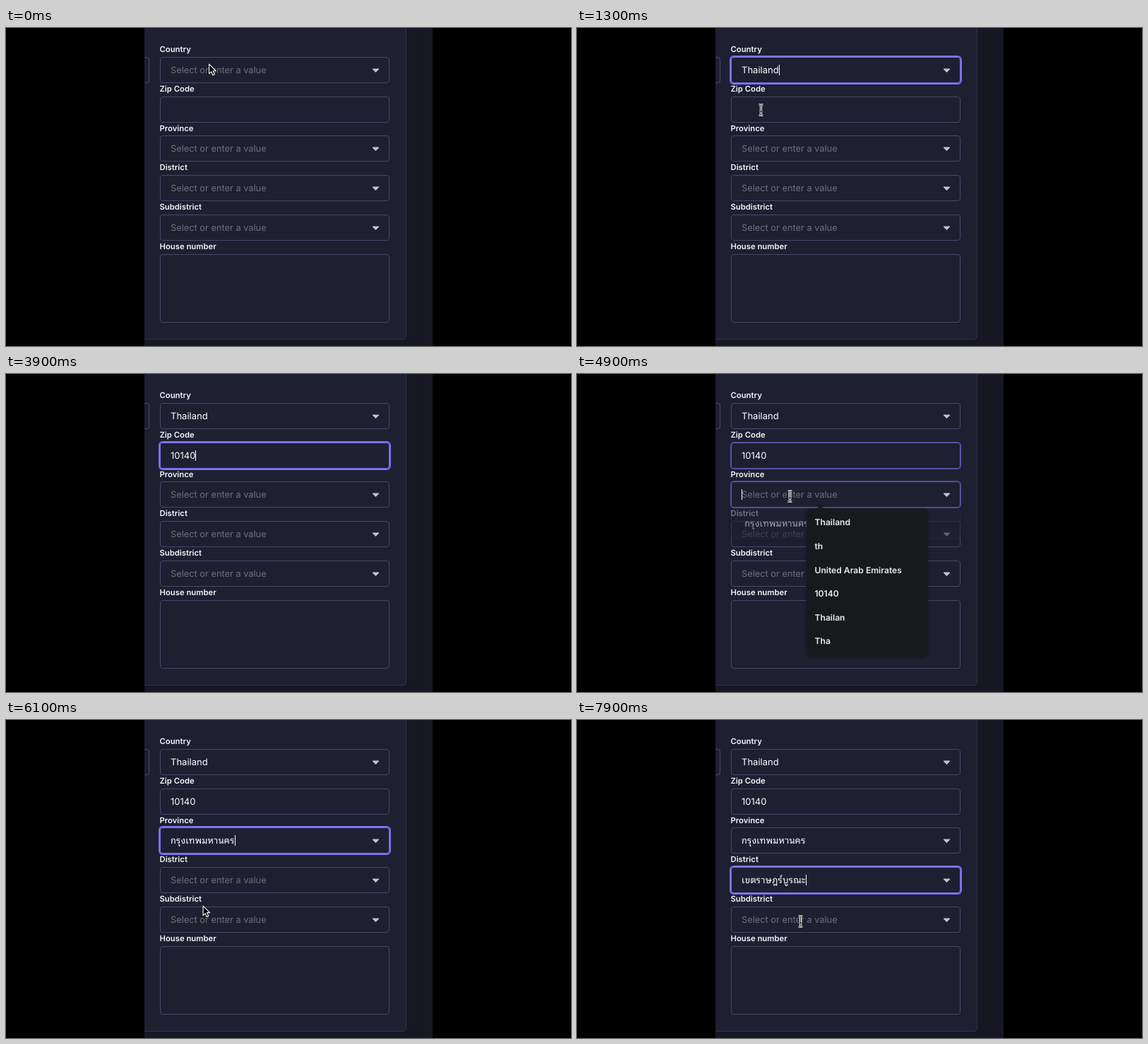
Animation, 800 px wide and 450 px high, one loop 8 s. Source, as an HTML page:

```html
<!DOCTYPE html>
<html lang="en">
<head>
<meta charset="utf-8">
<title>Address form</title>
<style>
  html, body { margin: 0; width: 100%; height: 100%; overflow: hidden; background: #000; }
  #stage { position: absolute; left: 0; top: 0; width: 800px; height: 450px; overflow: hidden;
    font: 12.8px/16px Inter, "Noto Sans Thai Looped", "Noto Looped Thai", "Noto Serif Thai", "Noto Sans Thai", "Noto Sans", sans-serif;
    color: #fff; text-rendering: geometricPrecision; white-space: pre; }
  #stage div, #stage svg, #stage i { position: absolute; box-sizing: border-box; }
  #page { left: 196px; top: 0; width: 408px; height: 450px; background: #171723; overflow: hidden; }
  #card { left: -20px; top: -20px; width: 391px; height: 461px; background: #1e1f31;
    border: 1px solid #303050; border-radius: 5px; }
  .label { left: 217.5px; font-size: 11.3px; font-weight: 600; color: #f5f5f9; }
  .field { left: 218px; width: 325px; height: 37px; padding-left: 14px; line-height: 37px;
    border: 1px solid #48486a; border-radius: 4px; }
  .value { font-size: 13px; }
  .hint { color: #70707a; }
  .field i { top: 10px; width: 1px; height: 15px; background: #fff; }
  .field svg { left: 298px; top: 14px; overflow: visible; }
  .list { left: 218px; width: 325px; padding: 4px; background: #1e1f31; border: 1px solid #2b2b45;
    border-radius: 4px; box-shadow: 0 2px 8px #0003; font-size: 13px; }
  .list div { left: 4px; width: 317px; height: 33.5px; padding-left: 14.3px; line-height: 33.5px; border-radius: 3px; }
  .popup { width: 172px; background: #171a1d; border-radius: 8px; box-shadow: 0 1px 4px #0004;
    font-size: 12.1px; font-weight: 600; color: #ebebed; }
  .popup div { left: 11.5px; }
  .popup svg { left: 13px; top: -6px; }
  #pointer { left: 0; top: 0; overflow: visible; }
</style>
</head>
<body>
<div id="stage">
  <div id="page"><div id="card"></div></div>
</div>
<script>
const LOOP = 8000, HINT = 'Select or enter a value';
const BANGKOK = 'กรุงเทพมหานคร', DISTRICT = 'เขตราษฎร์บูรณะ';
const SUGGESTIONS = ['Thailand', 'th', 'United Arab Emirates', '10140', 'Thailan', 'Tha'];
const stage = document.getElementById('stage');

const clamp = v => Math.max(0, Math.min(1, v));
const ramp = (t, start, length) => clamp((t - start) / length);
const mix = (a, b, p) => a + (b - a) * p;
const show = (el, on) => { el.style.display = on ? '' : 'none'; };

function add(parent, cls, style = {}, html = '') {
  const el = document.createElement('div');
  el.className = cls;
  el.innerHTML = html;
  for (const key in style) el.style[key] = typeof style[key] === 'number' ? style[key] + 'px' : style[key];
  parent.appendChild(el);
  return el;
}

// Each value is [time, text]; focus is [from, to].
const fieldSpecs = [
  { name: 'Country', select: true, focus: [500, 1500], values: [[1050, 'Thailand']] },
  { name: 'Zip Code', focus: [1500, 4830],
    values: [[2540, '1'], [2980, '10'], [3400, '101'], [3700, '1014'], [3850, '10140']] },
  { name: 'Province', select: true, focus: [4830, 6450], values: [[5650, BANGKOK]] },
  { name: 'District', select: true, focus: [6450, 9000], values: [[7450, DISTRICT]] },
  { name: 'Subdistrict', select: true, values: [] },
  { name: 'House number', values: [], height: 97.5 }
];
const fieldTop = i => 40.9 + 55.75 * i;
const ARROW = '<svg width="12" height="8"><path d="M2 2H11L6.5 6.6Z" fill="#c3c3d0" stroke="#c3c3d0" stroke-linejoin="round"/></svg>';

add(stage, 'field', { left: 196, top: 41, width: 7, borderLeft: 'none', padding: 0, borderRadius: '0 4px 4px 0' });

const fields = fieldSpecs.map((spec, i) => {
  add(stage, 'label', { top: fieldTop(i) - 18.9 }, spec.name);
  const box = add(stage, 'field', { top: fieldTop(i), height: spec.height || 37 },
    '<span class="value"></span><i></i><span class="hint"></span>' + (spec.select ? ARROW : ''));
  const [value, caret, hint] = box.children;
  return { ...spec, box, value, caret, hint };
});

function drawField(f, t) {
  const [from, to] = f.focus || [9000, 9000];
  const past = f.values.filter(v => v[0] <= t);
  const last = past[past.length - 1];
  f.value.textContent = last ? last[1] : '';
  f.hint.textContent = f.select && !last ? HINT : '';
  const blinkStart = last ? last[0] : from;
  show(f.caret, t >= from && t < to && (t - blinkStart) % 1000 < 500);
  const p = ramp(t, from, 150) * (1 - ramp(t, to, 150));
  const [r, g, b] = [[72, 123], [72, 115], [106, 243]].map(([a, z]) => mix(a, z, p));
  f.box.style.borderColor = `rgb(${r},${g},${b})`;
  f.box.style.boxShadow = `0 0 0 ${2 * p}px rgba(123,115,243,${p})`;
}

// Option lists that slide in below a field.
const lists = [
  { field: 0, items: ['Thailand'], from: 570, to: 1050 },
  { field: 2, items: [BANGKOK], from: 4830, to: 5650 },
  { field: 3, items: [DISTRICT, 'เขตทุ่งครุ'], from: 6480, to: 7450 }
].map(l => {
  const top = fieldTop(l.field) + 41.3;
  const box = add(stage, 'list', { top, height: 10 + 33.5 * l.items.length });
  const rows = l.items.map((text, i) => add(box, '', { top: 4 + 33.5 * i }, text));
  return { ...l, top, box, rows };
});

function drawList(l, t, pointer) {
  const enter = ramp(t, l.from, 120), leave = ramp(t, l.to, 100);
  show(l.box, enter > 0 && leave < 1);
  l.box.style.opacity = enter * (1 - leave);
  l.box.style.transform = `translateY(${-8 * (1 - enter)}px)`;
  l.rows.forEach((row, i) => {
    const y = pointer.y - l.top - 2 - 33.5 * i;
    row.style.background = !pointer.beam && y >= 0 && y < 33.5 ? '#191825' : '';
  });
}

// Browser suggestions, shown and hidden at once.
const popups = [
  { left: 325, top: 79.6, from: 600, to: 1050 },
  { left: 310, top: 141, from: 1600, to: 2600 },
  { left: 310, top: 141, width: 146, items: ['10140'], from: 2600, to: 3880 },
  { left: 325, top: 190.4, from: 4870, to: 5650 },
  { left: 325, top: 246.6, from: 6520, to: 7450 }
].map(p => {
  const items = p.items || SUGGESTIONS;
  const box = add(stage, 'popup',
    { left: p.left, top: p.top, width: p.width || 172, height: 8.5 + 33.5 * items.length },
    '<svg width="13" height="7"><path d="M0 7Q3 6 5 2Q6.5 0 8 2Q10 6 13 7Z" fill="#171a1d"/></svg>');
  items.forEach((text, i) => add(box, '', { top: 12 + 33.6 * i }, text));
  return { ...p, box };
});

// Pointer steps: time, x, y, text beam or arrow.
const path = [
  [0, 287, 51, 0], [200, 286, 58, 1], [600, 286, 58, 1], [780, 276, 84, 0], [980, 263, 103, 0],
  [1060, 263, 103, 0], [1200, 260.5, 113, 1], [1300, 260.5, 116, 1],
  [4080, 345, 90, 1], [4200, 338, 112, 1], [4500, 301.5, 173, 1], [4950, 301.5, 173, 1],
  [5150, 294, 193, 0], [5450, 282, 212, 0], [5750, 282, 212, 0], [6100, 278.5, 263, 0],
  [6220, 277, 244, 1], [6380, 274, 231, 1], [6500, 274, 231, 1], [6580, 264, 246, 0],
  [6700, 255, 252.5, 0], [7000, 255, 252.5, 0], [7250, 259, 267, 0], [7500, 259, 267, 0],
  [7660, 285, 276, 1], [7900, 316.5, 285, 1], [8000, 316.5, 285, 1]
];
stage.insertAdjacentHTML('beforeend', `<svg id="pointer" width="1" height="1" stroke-linejoin="round">
  <defs><path id="beam" d="M-2.8-7.5Q0-7.5 0-5.5Q0-7.5 2.8-7.5M0-5.5V5.5M-2.8 7.5Q0 7.5 0 5.5Q0 7.5 2.8 7.5M-1.8 2H1.8"/></defs>
  <path class="arrow" d="M.6 .2V13.6L3.7 10.8L5.8 15.7L8.2 14.7L6.1 9.8H10.2Z" fill="#000" stroke="#fff" stroke-width="1.1"/>
  <g class="text" fill="none"><use href="#beam" stroke="#fff" stroke-width="3"/><use href="#beam" stroke="#111"/></g>
</svg>`);
const pointerEl = document.getElementById('pointer');
const arrowShape = pointerEl.querySelector('.arrow'), beamShape = pointerEl.querySelector('.text');

function pointerAt(t) {
  const i = Math.max(0, path.findIndex(s => s[0] > t) - 1);
  const [time, x, y, beam] = path[i], next = path[i + 1];
  // The first step and the pause for typing end in a jump.
  const p = time === 0 || time === 1300 ? 0 : ramp(t, time, next[0] - time);
  return { x: mix(x, next[1], p), y: mix(y, next[2], p), beam, hidden: t >= 2540 && t < 4080 };
}

function drawPointer(p) {
  show(pointerEl, !p.hidden);
  show(arrowShape, !p.beam);
  show(beamShape, p.beam);
  pointerEl.style.transform = `translate(${p.x}px,${p.y}px)`;
}

function frame() {
  const t = performance.now() % LOOP, pointer = pointerAt(t);
  fields.forEach(f => drawField(f, t));
  lists.forEach(l => drawList(l, t, pointer));
  popups.forEach(p => show(p.box, t >= p.from && t < p.to));
  drawPointer(pointer);
  requestAnimationFrame(frame);
}
frame();
</script>
</body>
</html>
```
